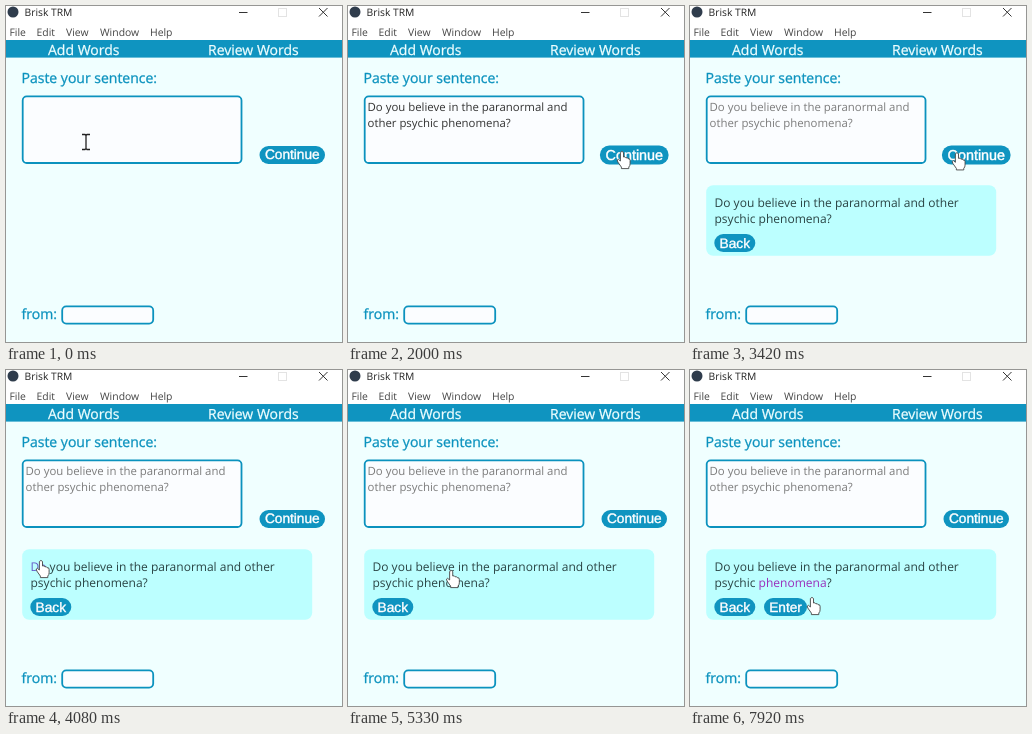
Recreate the animation shown at these times as an HTML page. Size 336 by 336 pixels, loop 8000 ms.

```html
<!DOCTYPE html>
<html lang="en">
<head>
<meta charset="utf-8">
<title>Brisk TRM</title>
<style>
  html, body { margin: 0; width: 100%; height: 100%; overflow: hidden; background: #f0ffff; }
  svg { display: block; width: 100vw; height: 100vh; font-family: "Open Sans", "Noto Sans", sans-serif; text-rendering: geometricPrecision; }
  .title { font-size: 10.3px; fill: #222; }
  .menu { font-size: 10.4px; fill: #444; }
  .nav { font-size: 14px; fill: #f0ffff; stroke: #f0ffff; stroke-width: .25; }
  .label { font-size: 14px; fill: #0b92be; stroke: #0b92be; stroke-width: .3; }
  .field { fill: #fbfdff; stroke: #0b92be; stroke-width: 1.8; }
  .typed { font-size: 11.4px; fill: #333; }
  .off { fill: #7c7c7c; }
  .card { font-size: 12px; fill: #2a4444; }
  .button rect { fill: #0f94c0; }
  .button text { font: 13.7px "Liberation Sans", Arial, sans-serif; fill: #fff; stroke: #fff; stroke-width: .4; text-anchor: middle; }
  .control { fill: none; stroke: #333; stroke-width: 1; }
  .cursor { fill: #fff; stroke: #444; stroke-width: .9; stroke-linejoin: round; }
</style>
</head>
<body>
<svg viewBox="0 0 336 336">
  <rect width="336" height="336" fill="#f0ffff"/>
  <rect width="336" height="34" fill="#fff"/>
  <circle cx="7" cy="6" r="5.5" fill="#2f3c4c"/>
  <text class="title" x="18.5" y="10">Brisk TRM</text>
  <path class="control" d="M233 6.5h8.5M313 2l8.5 8.5m0-8.5l-8.5 8.5"/>
  <rect class="control" x="272.5" y="2.5" width="8" height="8" style="stroke:#e3e3e3"/>
  <g class="menu">
    <text x="3.5" y="30">File</text>
    <text x="30.5" y="30">Edit</text>
    <text x="60" y="30">View</text>
    <text x="94" y="30">Window</text>
    <text x="144" y="30">Help</text>
  </g>
  <rect y="34" width="336" height="17.6" fill="#0f94c0"/>
  <text class="nav" x="42" y="48.5">Add Words</text>
  <text class="nav" x="202" y="48.5">Review Words</text>

  <text class="label" x="15.5" y="77">Paste your sentence:</text>
  <rect class="field" x="16.7" y="90.4" width="218.8" height="66.6" rx="4"/>
  <g id="typed" class="typed">
    <text x="19.5" y="105">Do you believe in the paranormal and</text>
    <text x="19.5" y="121">other psychic phenomena?</text>
  </g>
  <path id="caret" d="M164 109.5v14" stroke="#111"/>

  <g id="continue" class="button">
    <rect x="253.5" y="140" width="65.5" height="18" rx="9"/>
    <text x="286.3" y="153.4">Continue</text>
  </g>

  <g id="card" class="card">
    <rect x="16.2" y="179.3" width="290" height="70.5" rx="7" fill="#bcffff"/>
    <text x="24.5" y="201"><tspan id="do">Do</tspan> you <tspan id="believe">believe</tspan> in the <tspan id="paranormal">paranormal</tspan> and other</text>
    <text x="24.5" y="217">psychic <tspan id="phenomena">phenomena</tspan>?</text>
    <g class="button">
      <rect x="24.3" y="228" width="41" height="18" rx="9"/>
      <text x="44.8" y="241.7">Back</text>
    </g>
    <g id="enter" class="button">
      <rect x="74" y="228" width="43" height="18" rx="9"/>
      <text x="95.5" y="241.7">Enter</text>
    </g>
  </g>

  <text class="label" x="15.5" y="312.5">from:</text>
  <rect class="field" x="56.2" y="300.4" width="91" height="17.2" rx="4"/>

  <path id="beam" d="M-4-7.5h3l1 1 1-1h3M0-6.5v13M-4 7.5h3l1-1 1 1h3" fill="none" stroke="#222" stroke-width="1.3"/>
  <path id="arrow" class="cursor" d="M0 0v14l3.2-3 2.2 5 2-.9-2.1-4.8h4.4z"/>
  <path id="hand" class="cursor" d="M-2.6 1.5Q-1-.8 .5 1.5V6q1.7-.8 2.4.8 1.7-.6 2.2.9 2-.4 2 1.6v3.5q0 2-1.3 3.2v1.6h-7.4v-1.5L-5.2 11q-1.4-2.5.6-2.7l2 1.7z"/>
</svg>
<script>
const LOOP = 8000, STEP = 1000 / 12;
const $ = id => document.getElementById(id);
const show = (id, on) => $(id).setAttribute("visibility", on ? "inherit" : "hidden");
const within = (t, a, b) => t >= a && t < b;

// Pointer hot spot: time, x, y
const path = [
  [0, 80, 136], [300, 80, 136], [900, 76, 107], [1080, 76, 107],
  [1750, 275, 145], [3350, 275, 145], [4000, 36, 190], [4170, 36, 190],
  [4580, 73, 200], [5080, 73, 200], [5660, 150, 200], [6000, 150, 200],
  [6160, 129, 208], [7083, 129, 208], [7660, 123, 227], [LOOP, 123, 227]
];

// Highlighted words: id, start, end, colour
const hovers = [
  ["do", 3980, 4300, "#655bc8"],
  ["believe", 4490, 5300, "#9a30bc"],
  ["paranormal", 5600, 6080, "#9a30bc"],
  ["phenomena", 6080, LOOP, "#9a30bc"]
];

function pointer(t) {
  const i = path.findIndex(p => p[0] > t);
  const [a, x, y] = path[i - 1], [b, u, v] = path[i];
  const k = (t - a) / (b - a), e = k * k * (3 - 2 * k);
  return [x + (u - x) * e, y + (v - y) * e];
}

function draw(t) {
  const [x, y] = pointer(t);
  const sent = t >= 2240, pasted = t >= 660;
  const overButton = x > 253 && x < 319 && y > 140 && y < 158;
  const overField = x > 16 && x < 236 && y > 90 && y < 157;
  const kind = overButton || (sent && y > 186) ? "hand"
    : overField && !sent ? "beam" : "arrow";

  show("typed", pasted);
  $("typed").classList.toggle("off", sent);
  show("caret", pasted && t < 1750);
  show("card", sent);
  show("enter", t >= 6490);
  $("continue").setAttribute("transform",
    overButton ? "translate(286.3 149) scale(1.05) translate(-286.3 -149)" : "");
  for (const [id, a, b, color] of hovers) $(id).style.fill = within(t, a, b) ? color : "";
  for (const id of ["beam", "arrow", "hand"]) {
    show(id, id === kind);
    $(id).setAttribute("transform", `translate(${x} ${y})`);
  }
}

function tick() {
  const t = performance.now() % LOOP;
  draw(Math.min(Math.floor((t + 5) / STEP) * STEP, LOOP - 1));
  requestAnimationFrame(tick);
}
tick();
</script>
</body>
</html>
```
